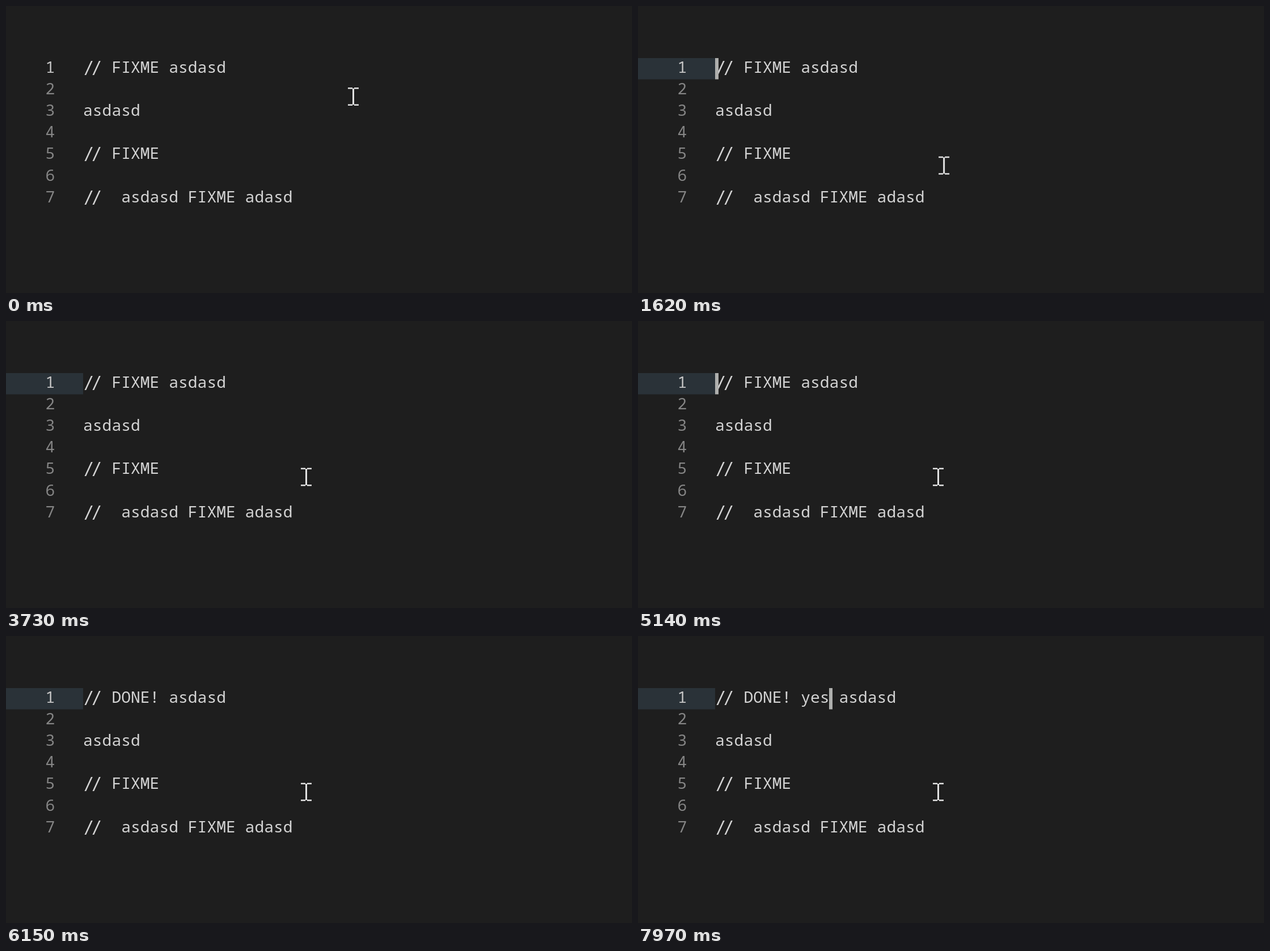
Animation, 1104 px wide and 507 px high, one loop 8000 ms. Source, as an HTML page with a canvas:

```html
<!DOCTYPE html>
<html lang="en">
<head>
<meta charset="utf-8">
<title>Editor</title>
<style>
  html, body { margin: 0; height: 100%; overflow: hidden; background: #1e1e1e; }
  canvas { display: block; }
</style>
</head>
<body>
<canvas id="stage" width="1104" height="507"></canvas>
<script>
const ctx = document.getElementById('stage').getContext('2d');
const LOOP = 8000, LEFT = 136, ADVANCE = 16.8, LINE = 38.1;
const CLICK = 1120, FOCUS = 1220, REPLACE = 5360, BLINK = 488;
const TYPED = ' yes', KEY_TIMES = [6660, 7270, 7770, 7970];
const OTHER_LINES = ['', 'asdasd', '', '// FIXME', '', '//  asdasd FIXME adasd'];
const FONT = '28px "Noto Sans Mono", "DejaVu Sans Mono", monospace';
const SLASH_FONT = '30px "DejaVu Sans Mono", monospace';

const smooth = u => u * u * (3 - 2 * u);
const easeOut = u => 1 - (1 - u) ** 2.5;
const bezier = (u, a, b, c) => (1 - u) ** 2 * a + 2 * u * (1 - u) * b + u * u * c;

// Progress of a movement, advancing in steps of 100 ms
const progress = (t, start, duration) =>
  Math.min(1, Math.max(0, Math.floor((t - start) / 100) * 100 / duration));

function pointerAt(t) {
  if (t < FOCUS) {
    const u = smooth(progress(t, 0, 800));
    return [bezier(u, 612.5, 250, 146.5), bezier(u, 160, 23, 102)];
  }
  const u = easeOut(progress(t, FOCUS, 600));
  return [bezier(u, 146.5, 627, 529.5), bezier(u, 102, 333, 275.5)];
}

function rect(color, x, y, w, h) {
  ctx.fillStyle = color;
  ctx.fillRect(x, y, w, h);
}

function drawLine(text, index) {
  const baseline = 118 + index * LINE;
  ctx.textAlign = 'left';
  ctx.font = FONT;
  ctx.fillStyle = index ? '#858585' : '#c6c6c6';
  ctx.fillText(index + 1, 69.6, baseline);

  ctx.fillStyle = '#d4d4d4';
  ctx.fillText(text.replace('//', '  '), LEFT, baseline);
  if (text.startsWith('//')) {
    // Joined slashes: taller and closer together than two separate ones
    ctx.font = SLASH_FONT;
    ctx.textAlign = 'center';
    for (const x of [146, 160]) ctx.fillText('/', x, baseline + 1);
  }
}

function drawCaret(t, keys) {
  const lastReset = [FOCUS, REPLACE, ...KEY_TIMES].findLast(time => time <= t);
  if (Math.floor((t - lastReset) / BLINK) % 2) return;
  const column = t < REPLACE ? 0 : '// DONE!'.length + keys;
  rect('#aeafad', Math.floor(LEFT + column * ADVANCE), 92, 6, 37.5);
}

function drawPointer(x, y) {
  ctx.save();
  ctx.globalCompositeOperation = 'difference';
  ctx.fillStyle = '#fff';
  ctx.beginPath();
  for (const top of [y - 16, y + 13.5]) {
    ctx.rect(x - 9.5, top, 8, 2.5);
    ctx.rect(x + 1.5, top, 8, 2.5);
  }
  ctx.rect(x - 1.5, y - 14.5, 3, 29);
  ctx.fill();
  ctx.restore();
}

function drawClick() {
  ctx.fillStyle = 'rgba(255, 255, 0, 0.47)';
  ctx.beginPath();
  ctx.arc(143, 100, 23, 0, Math.PI * 2);
  ctx.fill();
}

function draw(t) {
  const keys = KEY_TIMES.filter(time => time <= t).length;
  const tag = t < REPLACE ? 'FIXME' : 'DONE!';

  rect('#1e1e1e', 0, 0, 1104, 507);
  if (t >= FOCUS) rect('#2a3238', 0, 92, 136, 37.5);
  [`// ${tag}${TYPED.slice(0, keys)} asdasd`, ...OTHER_LINES].forEach(drawLine);
  if (t >= FOCUS) drawCaret(t, keys);
  drawPointer(...pointerAt(t));
  if (t >= CLICK && t < FOCUS) drawClick();
}

function tick() {
  draw(performance.now() % LOOP);
  requestAnimationFrame(tick);
}
tick();
</script>
</body>
</html>
```
